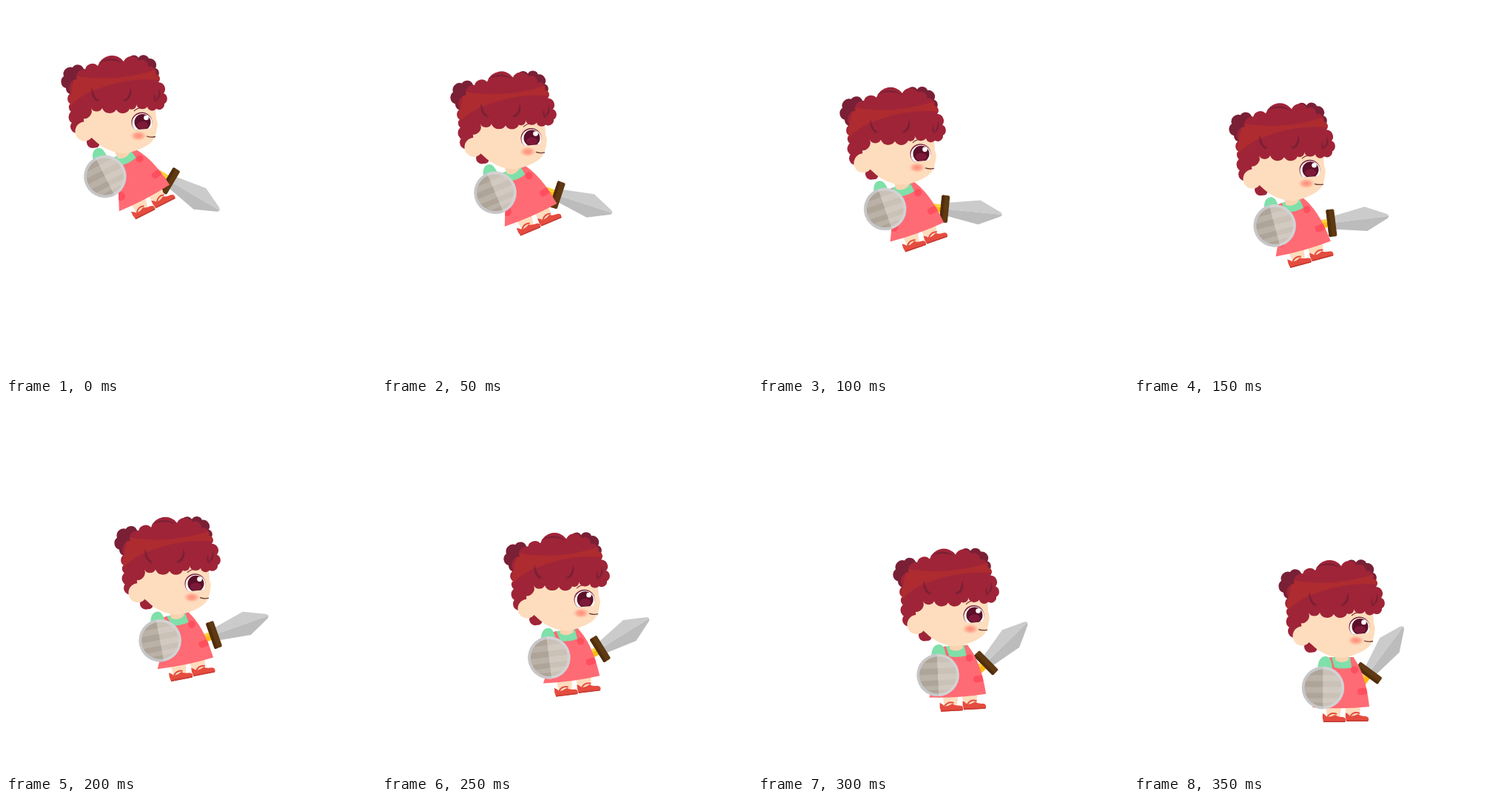
Recreate the animation shown at these times as an HTML page. Size 500 by 500 pixels, loop 500 ms.

```html
<!DOCTYPE html>
<html lang="en">
<head>
<meta charset="utf-8">
<title>Little knight</title>
<style>
  html, body { margin: 0; width: 100%; height: 100%; overflow: hidden; background: #fff; }
  svg { display: block; width: 100%; height: 100%; }
</style>
</head>
<body>
<svg viewBox="0 0 500 500">
  <defs>
    <radialGradient id="blush">
      <stop offset="0" stop-color="#ff8a78"/>
      <stop offset=".45" stop-color="#ff9c86" stop-opacity=".8"/>
      <stop offset="1" stop-color="#fdddbd" stop-opacity="0"/>
    </radialGradient>
    <clipPath id="hairClip"><path class="hair"/></clipPath>
    <clipPath id="dressClip"><path class="dress"/></clipPath>
    <clipPath id="woodClip"><circle r="25"/></clipPath>
    <clipPath id="eyeClip"><path d="M285 284H325V310Q305 309 285 314Z"/></clipPath>
  </defs>

  <!-- sword: origin at the guard, blade along +x -->
  <g id="sword">
    <rect x="-19" y="-5.500" width="16" height="11" fill="#fdb913"/>
    <rect x="-19" y="-5.500" width="16" height="4" fill="#ffd23c"/>
    <path d="M4 -9L47 -16.500L75 -3.500Q78 -2 78 0H4Z" fill="#cbcbcb"/>
    <path d="M4 9L47 16.500L75 3.500Q78 2 78 0H4Z" fill="#bcbcbc"/>
    <rect x="-5.500" y="-18.500" width="11" height="37" rx="2" fill="#5f3912"/>
    <rect x="-5.500" y="-18.500" width="4" height="37" rx="2" fill="#4f2d0c"/>
  </g>

  <g id="body">
    <path d="M259 406H281L278 423H261ZM285 406H307L304 423H287Z" fill="#fdddbd"/>
    <g id="shoe">
      <path d="M286 417Q290 419 292 422Q298 422 303 419Q306 422 313 422Q318 423 317 427L316 429H287Q285 423 286 417Z" fill="#e54c3f"/>
      <path d="M287 427.500H317L316 429H287Z" fill="#c23a33"/>
      <path d="M292 422Q297 415 305 418" fill="none" stroke="#e54c3f" stroke-width="2"/>
    </g>
    <use href="#shoe" transform="translate(-31 1)"/>
    <path d="M266 342L297 342L304 360H266Z" fill="#7fe0a9"/>
    <path d="M272 336H290V346Q281 352 272 346Z" fill="#f9d3b0"/>
    <path class="dress" fill="#ff6b74"/>
    <g clip-path="url(#dressClip)" fill="#ff4f5f">
      <circle cx="298" cy="359.500" r="5"/>
      <rect x="302" y="384" width="14" height="9" rx="4" transform="rotate(-8 308 389)"/>
      <circle cx="252" cy="393" r="6"/>
      <circle cx="280" cy="379" r="0"/>
    </g>
  </g>

  <path id="sleeve" d="M248 358Q249 341 259 341Q267 341 268 358Z" fill="#7fe0a9"/>

  <g id="head">
    <g fill="#9f2438">
      <circle cx="215" cy="294" r="9.500"/><circle cx="217" cy="307" r="9"/>
      <circle cx="228" cy="292" r="16"/>
      <circle cx="238" cy="328" r="8"/><circle cx="242" cy="330" r="5.500"/>
    </g>
    <g fill="#7a2036">
      <path class="bunLeft"/><path class="bunRight"/>
    </g>
    <path d="M228 280L321 274Q324 285 324 296Q327 303 325 309Q324 318 320 325Q312 336 284 343Q258 343 240 325Q226 314 226 296Z" fill="#fdddbd"/>
    <ellipse cx="227" cy="313.500" rx="12.500" ry="13" fill="#fdddbd"/>
    <ellipse cx="300" cy="319.500" rx="13" ry="8" fill="url(#blush)"/>

    <g clip-path="url(#eyeClip)">
      <ellipse cx="304.500" cy="301" rx="14" ry="13.500" fill="#7a2036"/>
      <ellipse cx="305" cy="302" rx="13.500" ry="13" fill="#fff"/>
      <circle cx="305.500" cy="301" r="11" fill="#5c1029"/>
      <ellipse cx="305.500" cy="305" rx="7.500" ry="5" fill="#7d1a3a"/>
      <circle cx="310.500" cy="295" r="3.300" fill="#fff"/>
    </g>
    <path d="M294 286Q299 281 305 282" fill="none" stroke="#8a3038" stroke-width="1.200"/>
    <path d="M311 320Q317 322 323 320.500" fill="none" stroke="#6d3a30" stroke-width="1.300"/>

    <path class="hair" fill="#9f2438"/>
    <path d="M214 238Q270 249 330 228V244Q285 240 245 256Q220 264 203 284Z" fill="#ae2b30" clip-path="url(#hairClip)"/>
    <g fill="#7a2036">
      <path d="M246 221Q262 209 279 221Q262 214 246 221Z"/>
      <path d="M237 254Q234 268 246 274Q240 266 237 254Z"/>
      <path d="M239 265Q242 272 249 272Q243 269 239 265Z"/>
      <path d="M289 254Q294 268 280 274Q288 266 289 254Z"/>
      <path d="M288 265Q285 272 278 272Q284 269 288 265Z"/>
      <path d="M328 256Q333 268 322 273Q328 266 328 256Z"/>
      <path d="M322 262Q318 270 324 275Q322 268 322 262Z"/>
    </g>
  </g>

  <g id="shield">
    <circle r="28.700" fill="#d2d2d4"/>
    <path d="M0 -28.700A28.700 28.700 0 0 0 0 28.700Z" fill="#c6c6c8"/>
    <g clip-path="url(#woodClip)">
      <rect x="-26" y="-26" width="26" height="52" fill="#aea498"/>
      <rect y="-26" width="26" height="52" fill="#cac1b7"/>
      <path d="M-26 -17H26V-9H-26ZM-26 -1H26V7H-26ZM-26 14H26V20H-26Z" fill="#fff" fill-opacity=".14"/>
    </g>
  </g>
</svg>
<script>
  const STEP = 50, LOOP = 500, TRAVEL = 336;
  const $ = id => document.getElementById(id);

  // Closed outline of outward bumps between the given valley points.
  function scallop(points) {
    let [x, y] = points[points.length - 1];
    let d = `M${x} ${y}`;
    for (const [nx, ny] of points) {
      const r = Math.hypot(nx - x, ny - y) * 0.56;
      d += `A${r} ${r} 0 0 1 ${nx} ${ny}`;
      [x, y] = [nx, ny];
    }
    return d + 'Z';
  }

  const shapes = {
    hair: scallop([
      [208, 276], [209, 262], [217, 243], [228, 230], [245, 225], [280, 219],
      [301, 218], [313, 226], [323, 236], [327, 247], [334, 262], [335, 276],
      [324, 283], [312, 280], [297, 277], [288, 283], [270, 284], [251, 282],
      [236, 282], [224, 296], [212, 288]
    ]),
    bunLeft: scallop([
      [199, 239], [211, 227], [226, 229], [231, 243], [216, 262], [202, 255]
    ]),
    bunRight: scallop([
      [287, 215], [300, 214], [314, 215], [323, 228], [325, 240], [306, 248], [290, 235]
    ]),
    dress: 'M262 343L267 342L271 356Q282 359 294 356L292 342L296 342Q313 363 318 409Q280 413 241 410Q252 386 266 357Z'
  };
  for (const name in shapes)
    document.querySelectorAll('.' + name).forEach(el => el.setAttribute('d', shapes[name]));

  const place = (id, x, y, turn = 0, cx = 0, cy = 0) =>
    $(id).setAttribute('transform', `translate(${x} ${y}) rotate(${turn} ${cx} ${cy})`);

  function draw(ms) {
    const t = Math.floor(ms % LOOP / STEP) * STEP;
    const p = Math.min(1, t / TRAVEL), q = 1 - p;
    const x = -121 * q, y = -144 * q;
    place('head', x, y);
    place('body', x, y, -27 * q, 281, 347);
    place('sleeve', x - 12 * q, y - 5 * q, -20 * q, 258, 349);
    place('shield', x + 255.5 - 0.5 * q + 8 * p * q, y + 383.5 - 9 * q - 8 * p * q, -27 * q);
    place('sword', x + 317.5 + 25 * q + 10 * p * q, y + 363.5 + 17 * q, 30.7 - 84.3 * p);
  }

  const start = performance.now();
  function tick() {
    draw(performance.now() - start);
    requestAnimationFrame(tick);
  }
  tick();
</script>
</body>
</html>
```
